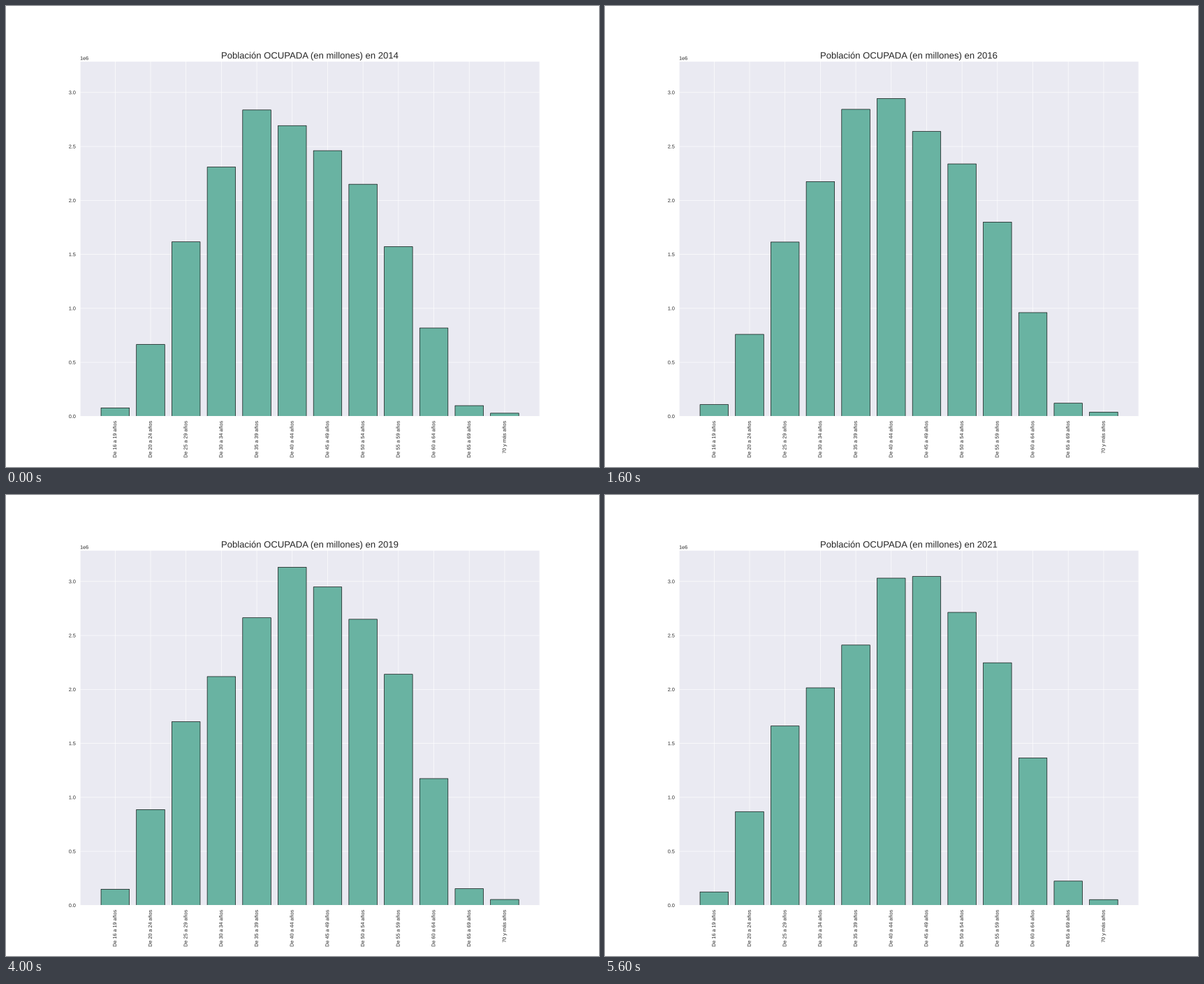
Recreate the animation shown at these times as a matplotlib script. Size 849 px wide and 660 px high, loop 6.4 s.

```python
import numpy as np
import matplotlib.pyplot as plt
from matplotlib import patheffects
from matplotlib.animation import FuncAnimation

W, H, DPI = 849, 660, 48
PT = W / 18 / DPI  # sizes are in points of an 18 inch wide page
INK = "0.15"

plt.rcParams.update({
    "font.family": "Liberation Sans",
    "text.color": INK,
    "text.hinting": "none",
    "path.snap": False,
    "path.effects": [patheffects.Normal()],  # text as outlines, placed between pixels
    "axes.facecolor": "#eaeaf2",
    "axes.edgecolor": "white",
    "axes.linewidth": 1.25 * PT,
    "axes.grid": True,
    "axes.axisbelow": True,
    "axes.titlesize": 20 * PT,
    "axes.titlepad": 6 * PT,
    "grid.color": "white",
    "grid.linewidth": 1 * PT,
})
for axis in ("xtick", "ytick"):
    plt.rcParams.update({
        f"{axis}.color": INK,
        f"{axis}.labelsize": 11 * PT,
        f"{axis}.major.size": 0,
        f"{axis}.major.pad": 9.5 * PT,
    })

START, PEAK, END = 2014, 2019, 2021
YEARS = range(START, END + 1)
GROUP = np.arange(12)

# Millions of people in work by age group in the three key years
AT_START = np.array([.078, .666, 1.616, 2.309, 2.838, 2.693,
                     2.461, 2.150, 1.572, .818, .099, .029])
AT_PEAK = np.array([.149, .887, 1.701, 2.119, 2.664, 3.132,
                    2.949, 2.650, 2.140, 1.174, .154, .054])
AT_END = np.array([.124, .868, 1.661, 2.015, 2.411, 3.031,
                   3.046, 2.714, 2.247, 1.365, .224, .053])

# Large birth cohorts bend the growth of the middle age groups
COHORT = (0.12 * np.sin(2 * np.pi * (GROUP - 3.5) / 4.4)
          * np.exp(-((GROUP - 4) / 2) ** 2))
# The slump before the end costs the young more jobs than the old
SLUMP = 0.1 * np.sqrt(np.clip(1 - (GROUP / 8) ** 2, 0, 1))


def blend(a, b, t):
    return a + (b - a) * t


def arch(t):
    return 4 * t * (1 - t)


def workers(year):
    if year <= PEAK:
        t = (year - START) / (PEAK - START)
        return blend(AT_START, AT_PEAK, t) + COHORT * arch(t)
    t = (year - PEAK) / (END - PEAK)
    level = blend(AT_PEAK, AT_END, t)
    return level - np.minimum(SLUMP, 0.25 * level) * arch(t)


ages = ["De 16 a 19 años"]
ages += [f"De {a} a {a + 4} años" for a in range(20, 70, 5)]
ages += ["70 y más años"]

fig = plt.figure(figsize=(W / DPI, H / DPI), dpi=DPI, facecolor="white")
ax = fig.add_axes([0.125, 0.11, 0.775, 0.77])
bars = ax.bar(ages, AT_START * 1e6, width=0.8, color="#69b3a2",
              edgecolor="black", linewidth=1 * PT)
ax.set_xlim(-0.99, 11.99)
ax.set_ylim(0, AT_PEAK.max() * 1.05e6)
ax.set_yticks(np.arange(0, 3.1e6, 0.5e6))
ax.tick_params(axis="x", rotation=90)
title = ax.set_title("")


def draw(i):
    for bar, millions in zip(bars, workers(YEARS[i])):
        bar.set_height(millions * 1e6)
    title.set_text(f"Población OCUPADA (en millones) en {YEARS[i]}")
    return [*bars, title]


draw(0)
anim = FuncAnimation(fig, draw, frames=len(YEARS), interval=800,
                     repeat=True, repeat_delay=0)
plt.show()
```
